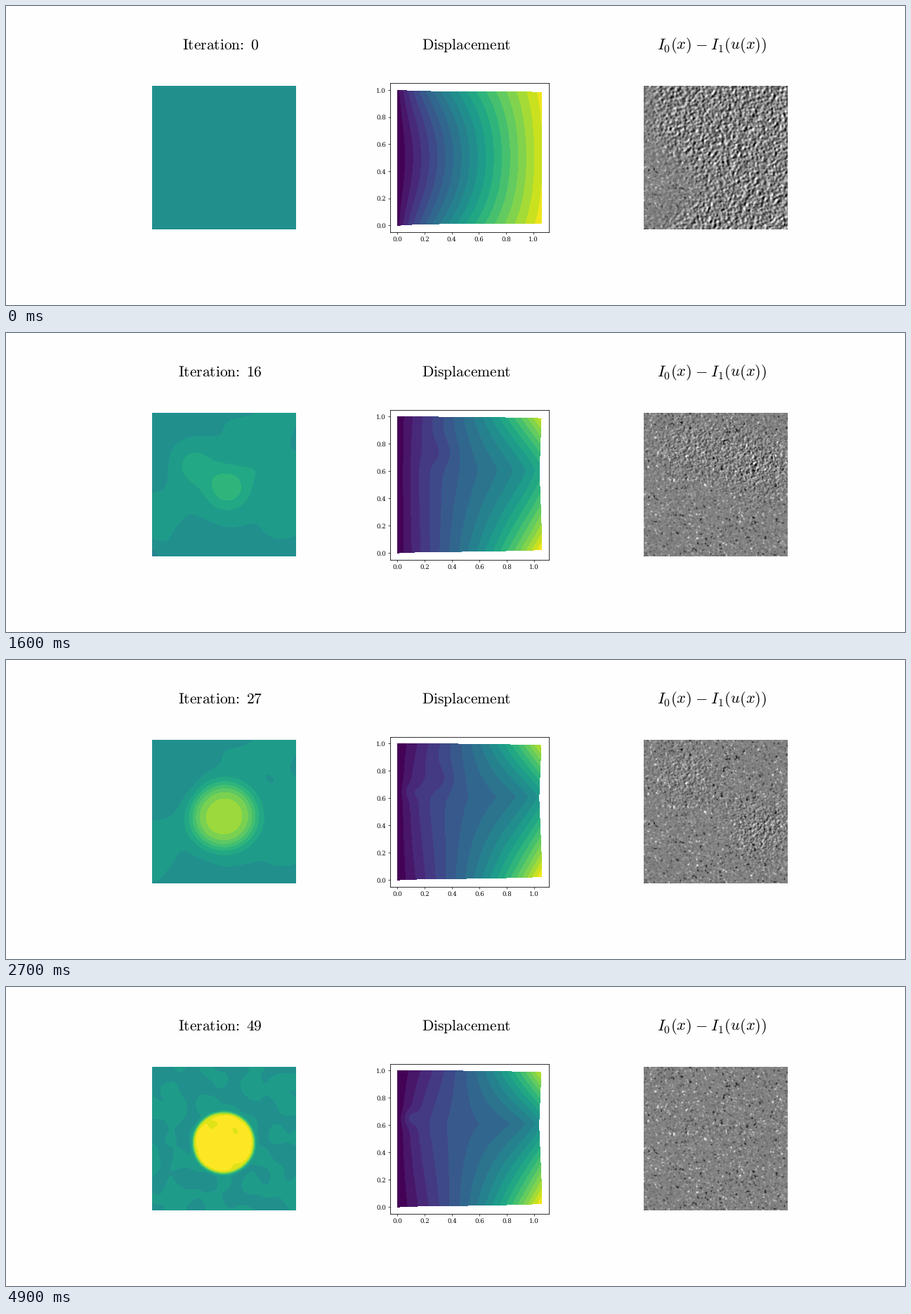
A matplotlib script for the animation above (5000 ms loop, 1280x427 px).

```python
import numpy as np
import matplotlib.pyplot as plt
from matplotlib.animation import FuncAnimation

W, H, DPI = 1280, 427, 64
PT = 72 / DPI  # points per pixel
FRAMES = 50

plt.rcParams["mathtext.fontset"] = "cm"
plt.rcParams["font.family"] = "DejaVu Serif"
plt.rcParams["text.hinting"] = "none"


def grid(n):
    return np.meshgrid(np.linspace(0, 1, n), np.linspace(0, 1, n))


def mix(a, b, t):
    return a + (b - a) * t


def ease(it, start, end):
    t = np.clip((it - start) / (end - start), 0, 1)
    return t * t * (3 - 2 * t)


def settle(it, rate, start=0):
    """Exponential approach from 0 to 1."""
    return 1 - np.exp(-max(it - start, 0) / rate)


def bumps(x, y, *parts):
    """Sum of round Gaussians given as (x, y, width, height)."""
    return sum(a * np.exp(-((x - cx) ** 2 + (y - cy) ** 2) / (2 * s * s))
               for cx, cy, s, a in parts)


# Material field (left)
gx, gy = grid(165)


def mottle(freq, seed):
    rng = np.random.default_rng(seed)
    z = 0
    for turn, phase, f in rng.uniform(0, 1, (14, 3)):
        k = 2 * np.pi * freq * (0.5 + f)
        ang = 2 * np.pi * turn
        z = z + np.cos(k * (gx * np.cos(ang) + gy * np.sin(ang)) + 2 * np.pi * phase)
    return z / z.std()


def first_glow():
    dx = np.where(gx < 0.37, 0.5, 1) * (gx - 0.37)
    far = np.clip((np.hypot(dx, gy - 0.45) - 0.5) * 0.3, 0, 0.04)
    corner = np.clip(1.27 - gx / 0.45 - gy / 0.35, 0, 2) * 0.1
    return 0.034 - far - corner


glow = first_glow()
blob = bumps(gx, gy, (0.53, 0.48, 0.11, 0.14), (0.29, 0.64, 0.11, 0.11),
             (0.74, 0.62, 0.08, 0.04), (0, 0, 0.05, -0.08))
coarse, fine = mottle(1.5, 9), mottle(4.2, 21)
radius = np.hypot(gx - 0.5, gy - 0.47)


def material(it):
    disc = 0.475 * settle(it, 9, 16)
    soft = 0.004 + 0.035 * np.exp((27 - it) / 8)
    grain = mix(coarse, fine, ease(it, 24, 44))
    z = mix(0.482, 0.518, ease(it, 0, 10))
    z = z + glow * (ease(it, 4, 10) - ease(it, 10, 16))
    z = z + blob * (ease(it, 9, 17) - ease(it, 20, 27))
    z = z + 0.011 * grain * ease(it, 10, 16) + 0.006 * ease(it, 27, 40)
    z = z + disc / (1 + np.exp(np.clip((radius - 0.21) / soft, -50, 50)))
    return np.clip(z, 0, 1)


# Displacement on the deformed square (middle)
px, py = grid(91)
arch = px + 0.13 * np.sin(np.pi * px ** 0.55)
plateau = 0.33 * (1 - np.exp(-px / 0.22)) + 0.16 * px ** 6


def displacement(it):
    u = settle(it, 12)
    ym = mix(0.5, 0.61, settle(it, 5))
    w = np.where(py < ym, (ym - py) / ym, (py - ym) / (1 - ym))
    w = w ** mix(2, 1.1, u)
    low = mix(0.98 * arch, 0.70 * px + 0.30 * px ** 4, u)
    high = mix(0.97 * arch, 0.62 * px + 0.28 * px ** 4, u)
    z = mix(mix(0.94 * px, plateau, u), np.where(py < ym, low, high), w)
    dip = 0.045 * (ease(it, 10, 18) - ease(it, 27, 36))
    z = z + bumps(px, py, (0.09, 0.65, 0.04, 0.06 * ease(it, 16, 36)),
                  (0.30, 0.74, 0.08, -dip))
    return np.clip(z, 0.0005, 0.9995)


def width(it):
    return 1.062 - 0.008 * settle(it, 5)


def shape(it):
    u = settle(it, 8)
    early, late = 1 - np.exp(-8 * px), px ** 2.5
    top = mix(0.012, 0.002, u) * early + mix(0.004, 0.012, u) * late
    bottom = mix(0.014, 0.009, u) * early + mix(0.004, 0.015, u) * late
    waist = 0.021 * u * (1 - np.abs(2 * py - 1.2).clip(0, 1))
    return px * (width(it) - waist * px), py * (1 - top) + (1 - py) * bottom


# Image residual (right)
N = 205
nx, ny = grid(N)


def speckle(sigma, seed):
    """Smooth random texture with unit deviation."""
    z = np.random.default_rng(seed).normal(size=(N, N))
    f = np.fft.fftfreq(N)
    k2 = f[:, None] ** 2 + f[None, :] ** 2
    z = np.fft.ifft2(np.fft.fft2(z) * np.exp(-2 * (np.pi * sigma) ** 2 * k2)).real
    return z / z.std()


def emboss(tex, dy, dx):
    z = tex - np.roll(tex, (-dy, dx), axis=(0, 1))
    return z / z.std()


wide = emboss(speckle(1.3, 3), 1, 2)
narrow = emboss(speckle(1.0, 5), 1, 2)
spots = speckle(0.9, 8)
spots = np.clip(0.02 * spots + 0.014 * spots ** 3, -0.32, 0.36)
shore = 0.06 + 0.33 * np.exp(-((ny - 0.28) / 0.25) ** 2)
ramp = 1 / (1 + np.exp((shore - nx) / 0.06))


def residual(it):
    patch = bumps(nx, ny, (0.30, 0.75, 0.17, 0.55),
                  (0.60, 0.75, 0.17, 0.55 * (1 - ease(it, 10, 22))),
                  (0.83, mix(0.62, 0.38, ease(it, 20, 27)), 0.16, 0.75))
    start = 1 - ease(it, 0, 10)
    middle = ease(it, 0, 10) - ease(it, 26, 35)
    return (0.505 + wide * (0.02 + 0.15 * ramp) * start
            + 0.17 * narrow * patch * middle + spots * (1 - 0.6 * ramp * start))


fig = plt.figure(figsize=(W / DPI, H / DPI), dpi=DPI, facecolor="#fefefe")


def box(x, y, w, h):
    return [x / W, 1 - (y + h) / H, w / W, h / H]


def title(x, text, size):
    return fig.text(x / W, 1 - 62.5 / H, text, fontsize=size * PT,
                    ha="center", va="baseline")


def counter(it):
    return (r"$\mathrm{Iteration}\hspace{-0.2}\mathrm{:}\hspace{0.3}\mathrm{%d}$"
            % it)


left = fig.add_axes(box(207.5, 114, 205, 205))
centre = fig.add_axes(box(547, 110, 226, 213), facecolor="white")
right = fig.add_axes(box(907.5, 114, 205, 205))
for ax in (left, right):
    ax.axis("off")

ticks = np.arange(6) / 5
centre.set_xticks(ticks)
centre.set_yticks(ticks)
centre.tick_params(length=3 * PT, width=0.7 * PT, pad=3 * PT, labelsize=8.6 * PT)
for spine in centre.spines.values():
    spine.set_linewidth(0.8 * PT)

label = title(305.2, counter(0), 21.5)
title(655.5, r"$\mathrm{Displacement}$", 21.5)
title(1004.7, r"$I_0(x)\hspace{0.06}-\hspace{0.06}I_1(u(x))$", 22.4)

noise = right.imshow(residual(0), cmap="gray", vmin=0, vmax=1, origin="lower",
                     interpolation="nearest", aspect="auto")
material_levels = np.linspace(-0.025, 1.025, 22)
move_levels = np.linspace(0, 1, 20)
drawn = []


def draw(it):
    while drawn:
        drawn.pop().remove()
    label.set_text(counter(it))

    drawn.append(left.contourf(gx, gy, material(it), material_levels,
                               cmap="viridis", vmin=0, vmax=1))
    left.set(xlim=(0, 1), ylim=(0, 1))

    drawn.append(centre.contourf(*shape(it), displacement(it), move_levels,
                                 cmap="viridis", vmin=0.02, vmax=1))
    span = width(it)
    height = 226 / span
    centre.set_position(box(547, 216.75 - height / 2, 226, height))
    centre.set(xlim=(-0.05 * span, 1.05 * span), ylim=(-0.05, 1.05))

    noise.set_data(residual(it))
    return []


anim = FuncAnimation(fig, draw, frames=FRAMES, interval=100, init_func=lambda: [],
                     repeat=True, repeat_delay=0, blit=False)
plt.show()
```
